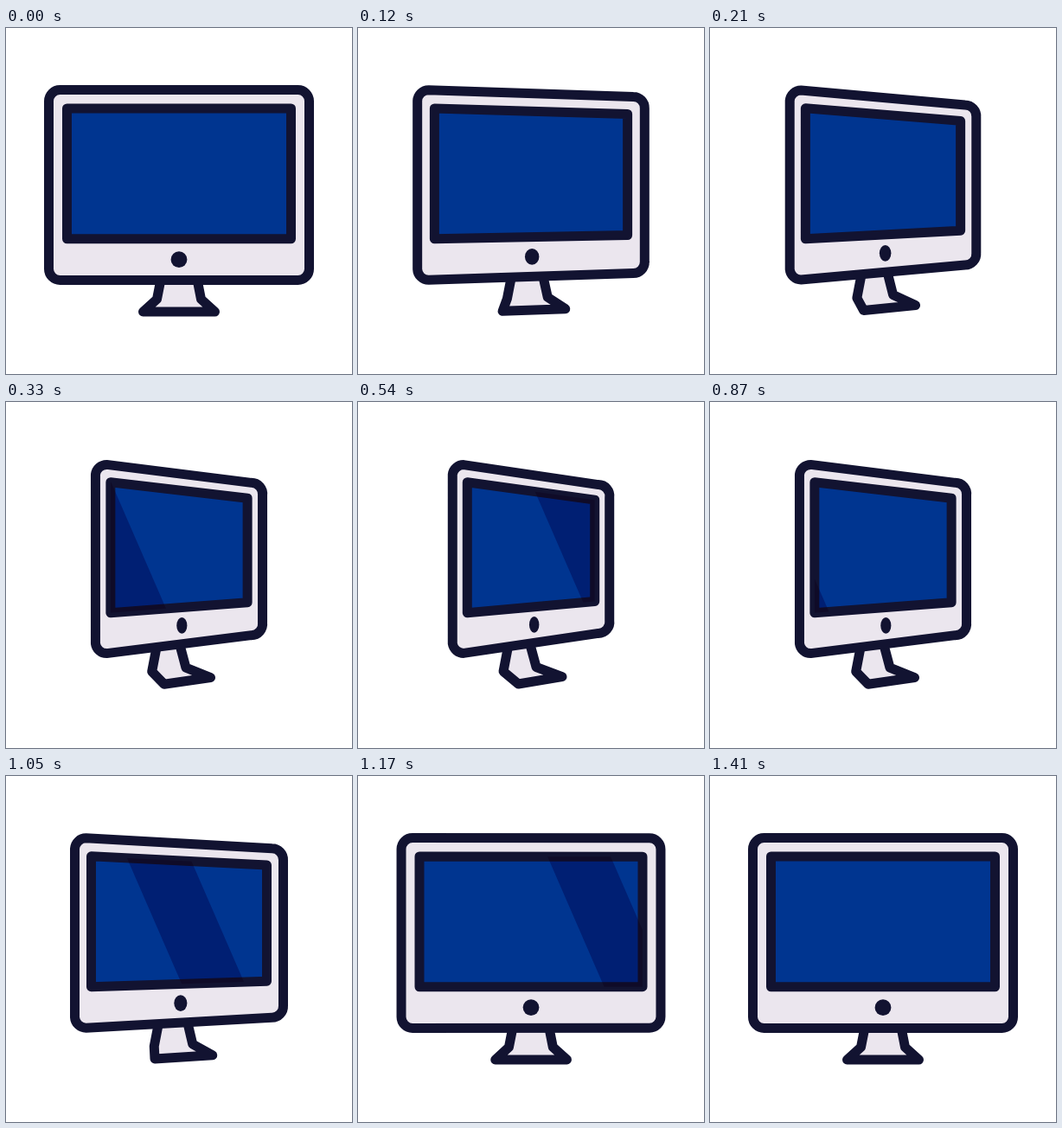
An HTML page for the animation above (2.12 s loop, 400x400 px).

```html
<!DOCTYPE html>
<html lang="en">
<head>
<meta charset="utf-8">
<title>Turning monitor</title>
<style>
  html, body { margin: 0; width: 100%; height: 100%; overflow: hidden; background: #fff; }
  svg { display: block; width: 100%; height: 100%; }
  .line { fill: #ebe6ee; stroke: #121331; stroke-width: 11; stroke-linejoin: round; }
  #screen { fill: #003590; }
  #button { fill: #121331; }
  #glare { mix-blend-mode: multiply; }
  #shine { fill: rgb(200, 148, 204); }
</style>
</head>
<body>
<svg viewBox="0 0 400 400">
  <defs><clipPath id="glass"><path id="pane"/></clipPath></defs>
  <path id="stand" class="line"/>
  <path id="body" class="line"/>
  <path id="screen" class="line"/>
  <ellipse id="button"/>
  <g id="glare" clip-path="url(#glass)"><path id="shine"/></g>
</svg>
<script>
const LOOP = 2120, STEP = 30, END = 1410, TURN = 600, MID = 200;

const set = (id, attrs) => {
  const el = document.getElementById(id);
  for (const key in attrs) el.setAttribute(key, attrs[key]);
};
const mix = (a, b, k) => a + (b - a) * k;
const poly = pts => 'M' + pts.map(p => p.join(' ')).join('L') + 'Z';

// Upright panel whose right side shrinks as it turns away.
const panel = (half, top, bottom, drop, rise) => [
  [MID - half, top], [MID + half, top + drop],
  [MID + half, bottom - rise], [MID - half, bottom]
];

function rounded(pts, r) {
  const toward = (a, b) => {
    const d = r / Math.hypot(b[0] - a[0], b[1] - a[1]);
    return [mix(a[0], b[0], d), mix(a[1], b[1], d)];
  };
  const n = pts.length;
  return pts.map((p, i) => {
    const from = toward(p, pts[(i + n - 1) % n]), to = toward(p, pts[(i + 1) % n]);
    return `${i ? 'L' : 'M'}${from.join(' ')}A${r} ${r} 0 0 1 ${to.join(' ')}`;
  }).join('') + 'Z';
}

// Neck, bend and foot: mirrored when seen from the front, swung by the turn.
const stand = k => [
  [MID - 19.7 - 5.5 * k, 284 - 8 * k],
  [MID - 25.5 - 6.5 * k, 313.5 - 2 * k],
  [MID - 41.5 + 27 * k, 328 - 2 * k],
  [MID + 41.5 - 5.5 * k, 328 - 10.5 * k],
  [MID + 25.5 - 19.5 * k, 313.5 - 7 * k],
  [MID + 19.7 - 22 * k, 284 - 8 * k]
];

// cubic-bezier(.333, 0, 0, 1)
function ease(x) {
  if (x <= 0 || x >= 1) return x <= 0 ? 0 : 1;
  let lo = 0, hi = 1;
  for (let i = 0; i < 30; i++) {
    const s = (lo + hi) / 2;
    if ((1 - s) ** 2 * s + s ** 3 < x) lo = s; else hi = s;
  }
  return lo * lo * (3 - 2 * lo);
}

// Slanted band that sweeps across twice, slowing a little on the way.
function band(t) {
  if (t < 210 || t >= END) return '';
  const p = (t - 210) % TURN / TURN;
  const lead = 23 + 530 * p - 130 * p * p, width = 73;
  const at = (x, y) => [x + (y - 98) * 0.435, y];
  return poly([at(lead - width, 60), at(lead, 60), at(lead, 280), at(lead - width, 280)]);
}

function draw(time) {
  const t = Math.min(END, Math.floor(time % LOOP / STEP) * STEP);
  const k = ease(1 - Math.abs(t - TURN) / TURN);
  const screen = poly(panel(129.5 - 56 * k, 93 - 0.3 * k, 243.8, 20.5 * k, 13.3 * k));
  set('stand', { d: poly(stand(k)) });
  set('body', { d: rounded(panel(150.5 - 60 * k, 71.5 - 0.8 * k, 291.5 + 0.8 * k, 26.9 * k, 26.9 * k), 13) });
  set('screen', { d: screen });
  set('pane', { d: screen });
  set('button', { cx: MID + 3.7 * k, cy: 267.7 - 10.3 * k, rx: 9.4 - 3.7 * k, ry: 9.4 });
  set('shine', { d: band(t) });
}

const start = performance.now();
function tick() {
  draw(performance.now() - start);
  requestAnimationFrame(tick);
}
tick();
</script>
</body>
</html>
```
